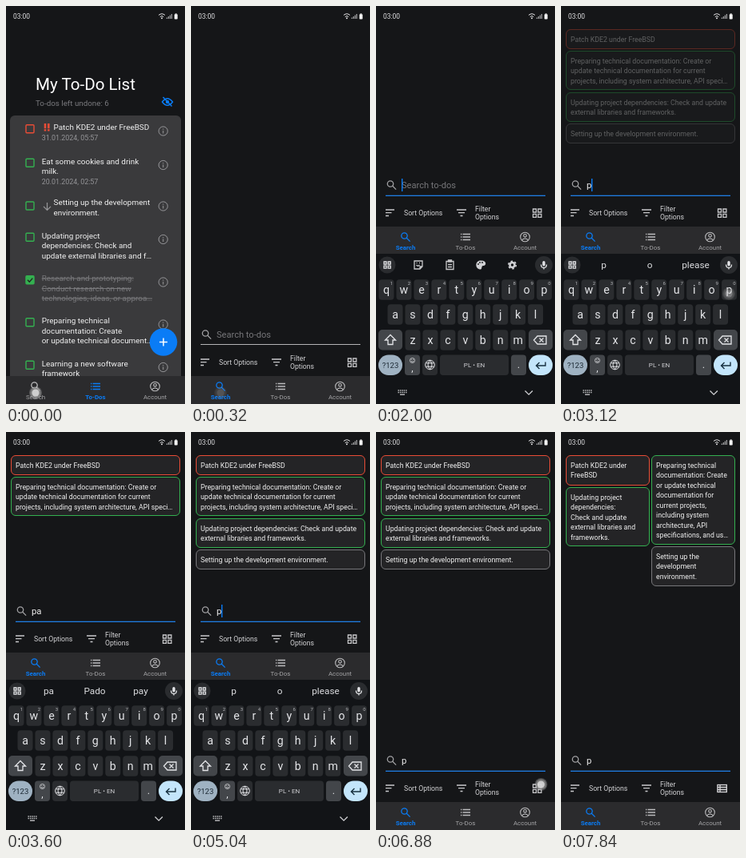
An HTML page for the animation above (8 s loop, 224 by 498 pixels).

```html
<!DOCTYPE html>
<html lang="en">
<head>
<meta charset="utf-8">
<title>To-do search</title>
<style>
html, body { margin: 0; width: 100%; height: 100%; overflow: hidden; background: #151618; }
svg { display: block; }
text { font-family: Roboto, sans-serif; white-space: pre; }
.ln { fill: none; stroke: currentColor; stroke-width: 1.3; }

/* 1% of the loop is 80 ms */
.step { animation: 8s step-end infinite; }
.move { animation: 8s cubic-bezier(.2, .6, .3, 1) infinite; }
.fade { animation: 8s linear infinite; }

@keyframes home { 0% { opacity: 1 } 3%, 100% { opacity: 0 } }
@keyframes search { 0% { opacity: 0 } 3%, 100% { opacity: 1 } }
@keyframes lift { 0%, 20.5% { transform: none } 25%, 72% { transform: translateY(-187px) } 76%, 100% { transform: none } }
@keyframes keyboard { 0%, 20.5% { transform: translateY(188px) } 25%, 72% { transform: none } 76%, 100% { transform: translateY(188px) } }
@keyframes blur { 0% { opacity: 1 } 20%, 100% { opacity: 0 } }
@keyframes focus { 0% { opacity: 0 } 20%, 100% { opacity: 1 } }
@keyframes empty { 0% { opacity: 1 } 38%, 100% { opacity: 0 } }
@keyframes typedP { 0% { opacity: 0 } 38% { opacity: 1 } 42% { opacity: 0 } 51%, 100% { opacity: 1 } }
@keyframes typedPa { 0% { opacity: 0 } 42% { opacity: 1 } 51%, 100% { opacity: 0 } }
@keyframes caret {
  0% { opacity: 0 } 20% { opacity: 1 } 28% { opacity: 0 } 32% { opacity: 1 }
  38% { opacity: 1; transform: translateX(6px) } 42% { opacity: 1; transform: translateX(12px) }
  45% { opacity: 0 } 51% { opacity: 1; transform: translateX(6px) }
  58% { opacity: 0; transform: translateX(6px) } 63% { opacity: 1; transform: translateX(6px) }
  81% { opacity: 0; transform: translateX(6px) } 88% { opacity: 1; transform: translateX(6px) }
  95%, 100% { opacity: 0; transform: translateX(6px) }
}
@keyframes both { 0%, 38.5% { opacity: 0 } 40%, 88.5% { opacity: 1 } 89%, 100% { opacity: 0 } }
@keyframes more { 0%, 38.5% { opacity: 0 } 40%, 42% { opacity: 1 } 43%, 52% { opacity: 0 } 54%, 88.5% { opacity: 1 } 89%, 100% { opacity: 0 } }
@keyframes list { 0% { opacity: 1 } 89%, 100% { opacity: 0 } }
@keyframes grid { 0% { opacity: 0 } 89%, 100% { opacity: 1 } }

@keyframes tapTab { 0%, 1% { opacity: 1 } 5%, 100% { opacity: 0 } }
@keyframes tapField { 0%, 13.9% { opacity: 0 } 14%, 20% { opacity: 1 } 23%, 100% { opacity: 0 } }
@keyframes tapP { 0%, 35.9% { opacity: 0 } 36%, 38% { opacity: 1 } 40%, 100% { opacity: 0 } }
@keyframes tapA { 0%, 40.9% { opacity: 0 } 41%, 42% { opacity: 1 } 45%, 100% { opacity: 0 } }
@keyframes tapDelete { 0%, 48.9% { opacity: 0 } 49%, 51% { opacity: 1 } 54%, 100% { opacity: 0 } }
@keyframes tapHide { 0%, 70.9% { opacity: 0 } 71%, 72% { opacity: 1 } 75%, 100% { opacity: 0 } }
@keyframes tapView { 0%, 85.9% { opacity: 0 } 86%, 88% { opacity: 1 } 92%, 100% { opacity: 0 } }
</style>
</head>
<body>
<svg id="stage" width="224" height="498" viewBox="0 0 224 498">
  <defs>
    <g id="find" class="ln"><circle cx="-1.5" cy="-1.5" r="3.7"/><path d="M1.3 1.3L5.6 5.6"/></g>
    <g id="lines" class="ln"><path d="M-3.5-3.5H6M-3.5 0H6M-3.5 3.5H6M-6-3.5H-4.7M-6 0H-4.7M-6 3.5H-4.7"/></g>
    <g id="user" class="ln" style="stroke-width:1.1"><circle r="5.8"/><circle cy="-1.7" r="1.8"/><path d="M-4 4C-2 1.4 2 1.4 4 4"/></g>
    <g id="info" class="ln" style="stroke-width:1"><circle r="5.6"/><path d="M0-.6V3M0-3V-1.8"/></g>
    <g id="box" class="ln" style="stroke-width:1.4"><rect x="-5" y="-5" width="10" height="10" rx="1"/></g>
    <g id="tiles" class="ln"><path d="M-5-5H-1V-1H-5ZM1.4-5H5.4V-1H1.4ZM-5 1.4H-1V5.4H-5ZM1.4 1.4H5.4V5.4H1.4Z"/></g>
    <g id="apps" class="ln"><path d="M-4-4H-1V-1H-4ZM1.2-4H4.2V-1H1.2ZM-4 1.2H-1V4.2H-4ZM1.2 1.2H4.2V4.2H1.2Z"/></g>
    <g id="rows" class="ln"><rect x="-5.6" y="-4.5" width="11.4" height="9"/><path d="M-2.5-4.5V4.5M-5.6-1.5H5.8M-5.6 1.5H5.8"/></g>
    <g id="mic"><rect x="-1.7" y="-5" width="3.4" height="6.4" rx="1.7" fill="currentColor"/><path class="ln" d="M-3.5-.5C-3.5 4-.5 3.3 0 3.3S3.5 4 3.5-.5M0 3.3V5.4"/></g>
    <g id="touch"><circle r="8" fill="#fff" opacity=".2"/><circle r="6.8" fill="#8c8c8c" opacity=".7"/><circle r="4.6" fill="#e4e4e4" opacity=".8"/></g>
  </defs>
</svg>
<script>
const BLUE = '#0a7cf6', RED = '#e84c36', GREEN = '#34b050', GRAY = '#77777a', BACK = '#151618';

const text = (x, y, size, str, fill = '#f2f2f2', extra = '') =>
  `<text x="${x}" y="${y}" font-size="${size}" fill="${fill}" ${extra}>${str}</text>`;
const mid = (x, y, size, str, fill, extra = '') => text(x, y, size, str, fill, 'text-anchor="middle" ' + extra);
const icon = (id, x, y, color = '#b8b8ba') => `<use href="#${id}" x="${x}" y="${y}" color="${color}"/>`;
const path = (d, color = '#c8c8ca', width = 1.3) => `<path d="${d}" fill="none" stroke="${color}" stroke-width="${width}"/>`;
const rect = (x, y, w, h, r, fill, extra = '') =>
  `<rect x="${x}" y="${y}" width="${w}" height="${h}" rx="${r}" fill="${fill}" ${extra}/>`;
const anim = (kind, name, body) => `<g class="${kind}" style="animation-name:${name}">${body}</g>`;

function tabs(active) {
  const items = [['find', 37, 'Search'], ['lines', 112, 'To-Dos'], ['user', 186.5, 'Account']];
  return rect(0, 463, 224, 35, 0, '#2b2b2d') + items.map(([id, x, label]) => {
    const on = label === active;
    return icon(id, x, 476, on ? BLUE : '#bcbcbe') +
      mid(x, 491.5, 7.9, label, on ? BLUE : '#a4a4a6', on ? 'font-weight="600"' : '');
  }).join('');
}

function todo([y, lines, date, color = GREEN, mark]) {
  const done = mark === 'done', x = mark && !done ? 59.5 : 44.7;
  const boxY = mark === 'low' ? y + 1 : y - 1.2;
  const fill = done ? '#78787b' : '#f2f2f2';
  let out = icon('box', 30, boxY, color) + icon('info', 196.7, y + 1.5, '#98989b');
  out += lines.map((s, i) => text(x, y + 12.5 * i, 9.93, s, fill, done ? 'text-decoration="line-through"' : '')).join('');
  if (date) out += text(44.7, y + 12.5 * lines.length + .5, 8.9, date, '#959598');
  if (done) out += rect(25, boxY - 5, 10, 10, 1, color) + path(`M27 ${boxY}l2.3 2.4l4-4.6`, '#222', 1.4);
  if (mark === 'urgent') out += path(`M49 ${y - 8}v6.2M53.3 ${y - 8}v6.2M49 ${y - .8}v2.3M53.3 ${y - .8}v2.3`, RED, 2.6);
  if (mark === 'low') out += path(`M51.5 ${y - 3}v9M47 ${y + 1.8}l4.5 4.5l4.5-4.5`, '#98989b', 1.2);
  return out;
}

function home() {
  const items = [
    [155, ['Patch KDE2 under FreeBSD'], '31.01.2024, 05:57', RED, 'urgent'],
    [197.5, ['Eat some cookies and drink', 'milk.'], '20.01.2024, 02:57'],
    [249, ['Setting up the development', 'environment.'], '', GREEN, 'low'],
    [290.5, ['Updating project', 'dependencies: Check and', 'update external libraries and f…']],
    [344, ['Research and prototyping:', 'Conduct research on new', 'technologies, ideas, or approa…'], '', GREEN, 'done'],
    [397, ['Preparing technical', 'documentation: Create', 'or update technical document…']],
    [450.5, ['Learning a new software', 'framework']]
  ];
  return rect(0, 0, 224, 498, 0, BACK) +
    text(37, 104.5, 20.6, 'My To-Do List', '#fff') + text(37, 124.5, 9.8, 'To-dos left undone: 6', '#7a7a7e') +
    path('M195.5 120Q202 111.5 208.5 120Q202 128.5 195.5 120ZM196.5 114l11 11.5', BLUE, 1.5) +
    `<circle cx="202" cy="120" r="2.2" fill="${BLUE}"/>` +
    rect(5, 137, 214, 340, 6, '#3a3a3c') + items.map(todo).join('') +
    `<circle cx="197" cy="420.5" r="17.3" fill="${BLUE}"/>` + path('M192 420.5h10M197 415.5v10', '#fff', 1.5) +
    tabs('To-Dos');
}

function card(x, y, w, h, color, lines) {
  return rect(x + .5, y + .5, w - 1, h - 1, 5.5, '#242426', `stroke="${color}" stroke-width="1"`) +
    lines.map((s, i) => text(x + 6, y + 16 + 12.45 * i, 8.77, s)).join('');
}

function results() {
  const wide = (y, h, color, ...lines) => card(6, y, 212, h, color, lines);
  const tall = (x, y, h, color, ...lines) => card(x, y, 105, h, color, lines);
  return anim('fade', 'both',
      wide(29, 25, RED, 'Patch KDE2 under FreeBSD') +
      wide(56, 49, GREEN, 'Preparing technical documentation: Create or',
        'update technical documentation for current', 'projects, including system architecture, API speci…')) +
    anim('fade', 'more',
      wide(108, 37, GREEN, 'Updating project dependencies: Check and update', 'external libraries and frameworks.') +
      wide(147, 25, GRAY, 'Setting up the development environment.')) +
    anim('step', 'grid',
      tall(6, 29, 38, RED, 'Patch KDE2 under', 'FreeBSD') +
      tall(6, 69, 74, GREEN, 'Updating project', 'dependencies:', 'Check and update', 'external libraries and', 'frameworks.') +
      tall(113, 29, 112, GREEN, 'Preparing technical', 'documentation: Create', 'or update technical', 'documentation for',
        'current projects,', 'including system', 'architecture, API', 'specifications, and us…') +
      tall(113, 143, 50, GRAY, 'Setting up the', 'development', 'environment.'));
}

function searchBar() {
  const label = (x, y, s) => text(x, y, 8.7, s, '#d4d4d6');
  return rect(0, 396, 224, 70, 0, BACK) + icon('find', 19.5, 411, '#a0a0a3') +
    anim('step', 'empty', text(32, 415, 11.1, 'Search to-dos', '#77777a')) +
    anim('step', 'typedP', text(32, 415, 11.3, 'p')) + anim('step', 'typedPa', text(32, 415, 11.3, 'pa')) +
    anim('step', 'caret', rect(32, 403, 1.4, 16, 0, BLUE)) +
    anim('step', 'blur', rect(12, 423, 200, 1, 0, '#b4b4b6')) +
    anim('step', 'focus', rect(12, 423.7, 200, 1.3, 0, '#1f7de4')) +
    path('M12 442h11M12 445.7h7.5M12 449.5h4M101 442h12M103 445.7h8M105.5 449.5h3') +
    label(35, 449, 'Sort Options') + label(124, 444, 'Filter') + label(124, 454, 'Options') +
    anim('step', 'list', icon('tiles', 201.5, 446, '#c8c8ca')) + anim('step', 'grid', icon('rows', 201.5, 446, '#d8d8da')) +
    tabs('Search');
}

function keyboard() {
  const KEY = '#2a2c2f', SIDE = '#43464a', INK = '#e4e5e8';
  const row = (letters, x0, y) => [...letters].map((c, i) => {
    const x = x0 + 21.95 * i;
    return rect(x - 9.5, y - 12.7, 19, 25.4, 4, KEY) + mid(x, y + 4.7, 14.2, c, INK) +
      (y < 360 ? mid(x + 6.5, y - 6, 6, (i + 1) % 10, '#b5b7ba') : '');
  }).join('');
  const words = list => list.map((w, i) => mid(53.5 + 57.5 * i, 328, 11.8, w, '#dcdde0')).join('');
  const tools =
    path('M48 319h10v7l-3 3h-7ZM58 326h-3v3M50.5 324q2 2.5 4 0M50.5 321.5h1M54 321.5h1') +
    path('M88 319.5h9v10h-9ZM90.5 318h4v2h-4ZM90 323.5h5M90 326.5h5') +
    '<path d="M131 318.5c8-.5 7.5 7 3 6.5c-2.5 0-1 4.5-3 4.5c-7.5 0-7.5-11 0-11Z" fill="#d0d1d4"/>' +
    [[128, 323], [130, 321], [133, 321]].map(([x, y]) => `<circle cx="${x}" cy="${y}" r=".9" fill="#111316"/>`).join('') +
    '<circle cx="170.5" cy="324" r="3" fill="none" stroke="#d0d1d4" stroke-width="2.6"/>' +
    '<circle cx="170.5" cy="324" r="4.8" fill="none" stroke="#d0d1d4" stroke-width="1.5" stroke-dasharray="2.5 2.52"/>';
  return rect(0, 310, 224, 188, 0, '#121417') +
    `<circle cx="14" cy="324" r="10.5" fill="${KEY}"/><circle cx="210" cy="324" r="11" fill="${KEY}"/>` +
    icon('apps', 14, 324, INK) + icon('mic', 210, 324, INK) +
    anim('step', 'empty', tools) + anim('step', 'typedP', words(['p', 'o', 'please'])) +
    anim('step', 'typedPa', words(['pa', 'Pado', 'pay'])) +
    row('qwertyuiop', 13, 355) + row('asdfghjkl', 24, 386) + row('zxcvbnm', 46, 418) +
    rect(3, 405, 30, 25.5, 5, SIDE) + path('M18 411.5l6.5 6.5h-3.5v5.5h-6v-5.5h-3.5Z', INK) +
    rect(191, 405, 30, 25.5, 5, SIDE) + path('M202 413h11v10h-11l-4.5-5ZM204.5 415.5l5 5M209.5 415.5l-5 5', INK) +
    rect(3, 436.5, 30, 25.5, 12.7, '#9fb2c2') + mid(18, 453, 9.5, '?123', '#1d2a35') +
    rect(36, 436.5, 19, 25.5, 4, SIDE) + mid(45.5, 457, 12, ',', INK) +
    `<circle cx="45.5" cy="443.5" r="3" fill="none" stroke="${INK}" stroke-width=".8"/>` +
    path('M44 444.3q1.5 1.8 3 0M44 442.5h.8M46.2 442.5h.8', INK, .8) +
    rect(58, 436.5, 19, 25.5, 4, KEY) +
    path('M61.7 449a5.8 5.8 0 1 0 11.6 0a5.8 5.8 0 1 0-11.6 0M62.5 446.8h10M62.5 451.2h10M67.5 443.2q-5 5.8 0 11.6q5-5.8 0-11.6', INK, 1) +
    rect(80, 436.5, 86, 25.5, 4, KEY) + mid(123, 452, 8, 'PL • EN', '#d0d1d4') +
    rect(169, 436.5, 19, 25.5, 4, SIDE) + mid(178.5, 453, 13, '.', INK) +
    rect(191, 436.5, 30, 25.5, 12.7, '#c3e5fb') + path('M212 445.5v4.5h-11M204.5 446l-4 4l4 4', '#17303f', 1.4) +
    '<path d="M27.5 481h11M27.5 483.5h11" stroke="#c8c8ca" stroke-width="1.4" stroke-dasharray="1.4 1"/>' +
    path('M30 486.2h6') +
    path('M186.5 481.5l4.7 4.7l4.7-4.7', '#d0d1d4', 1.3);
}

const status = text(9, 16, 8.4, '03:00', '#e0e0e2') +
  path('M191 11.5q4-3.5 8 0M192.8 13.5q2.2-2 4.4 0', '#e0e0e2', 1) + '<circle cx="195" cy="15.2" r="1" fill="#e0e0e2"/>' +
  path('M201.3 16v-1.5M203.3 16v-3M205.3 16v-4.5M207.3 16v-6', '#c8c8ca', 1) +
  rect(210.7, 10.2, 4, 6.3, .8, '#f4f4f4') + rect(211.7, 9.4, 2, 1.2, 0, '#f4f4f4');

const taps = [
  ['tapTab', 37, 484], ['tapField', 115, 405], ['tapP', 210, 360], ['tapA', 25, 381],
  ['tapDelete', 208.5, 422], ['tapHide', 191, 484], ['tapView', 206.5, 441]
].map(([name, x, y]) => anim('fade', name, icon('touch', x, y))).join('');

document.getElementById('stage').insertAdjacentHTML('beforeend',
  anim('step', 'search', rect(0, 0, 224, 498, 0, BACK) + results() + anim('move', 'lift', searchBar())) +
  anim('move', 'keyboard', keyboard()) +
  anim('step', 'home', home()) + status + taps);
</script>
</body>
</html>
```
